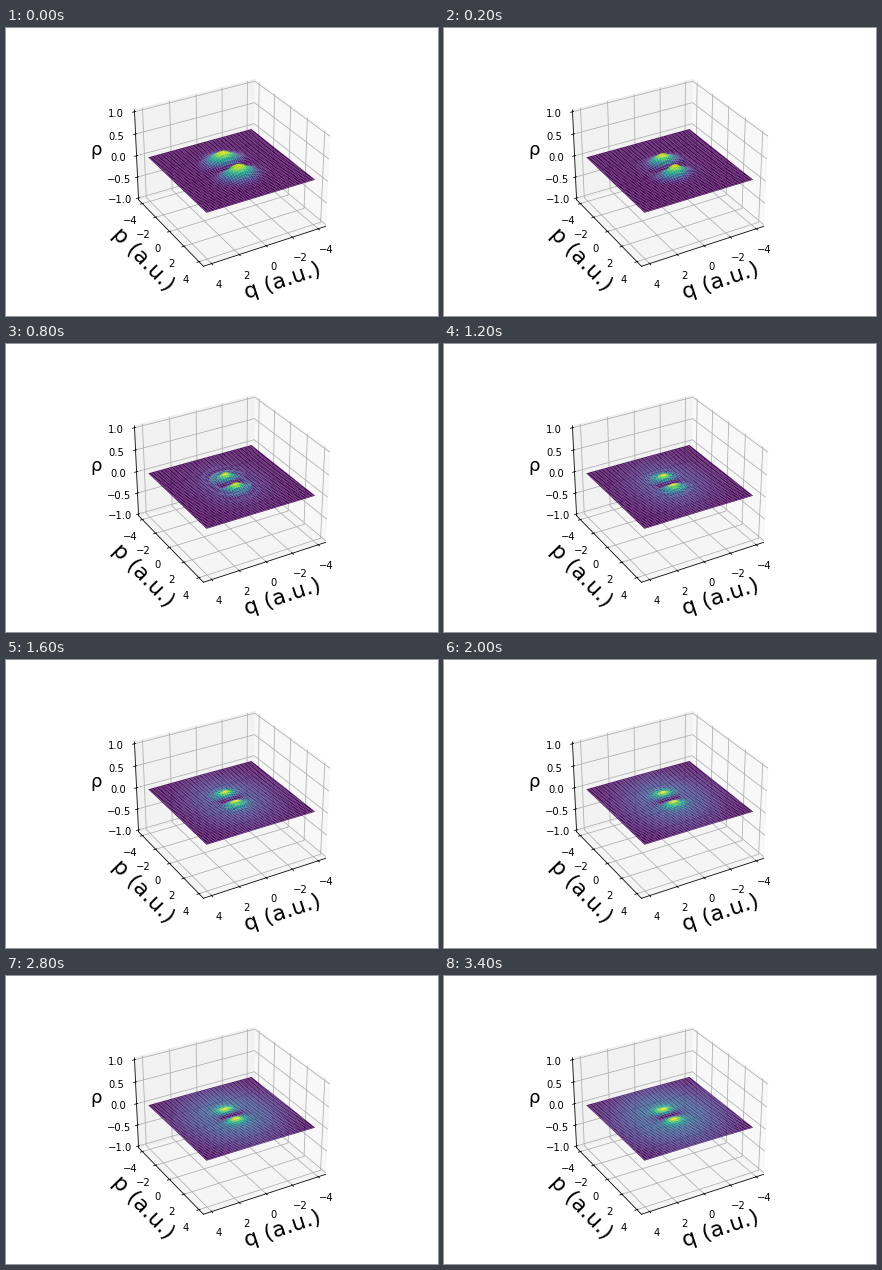
Recreate the animation shown at these times as a matplotlib script. Size 432x288 px, loop 3600 ms.

```python
import numpy as np
import matplotlib.pyplot as plt
from matplotlib.animation import FuncAnimation

FRAMES, INTERVAL = 18, 200
LIMIT = 4.4 * 25 / 24

plt.rcParams["font.family"] = "DejaVu Sans"
fig = plt.figure(figsize=(6, 4), dpi=72)
fig.subplots_adjust(left=0.125, right=0.9, bottom=0.125, top=0.88)
ax = fig.add_subplot(projection="3d")
ax.view_init(elev=30, azim=60)

axis = np.linspace(-4, 4, 100)
Q, P = np.meshgrid(axis, axis)

# Orbits of a stiffened oscillator: taller in p than wide in q.
Q_ORBIT = Q * np.sqrt(1 + 0.25 * Q**2)
ORBIT = np.hypot(Q_ORBIT, P)
ANGLE = np.arctan2(P, Q_ORBIT)


def core(k):
    """Two still lobes on the p axis that tighten with time."""
    w = 0.68 + 0.32 * np.exp(-k / 1.2)
    return np.e * (P / w) ** 2 * np.exp(-(Q**2 + P**2) / w**2)


def arms(k):
    """Spiral arms that wind up and blur into a widening background."""
    level = 0.6 * (1 - np.exp(-k / 7))
    shear = 1.15 * k * np.maximum(ORBIT - 0.85, 0)
    contrast = np.exp(-(shear / 6) ** 2 - k / 10)
    spiral = (1 - contrast * np.cos(2 * (ANGLE + shear))) ** 2
    hole = 1 - np.exp(-(P**2 + 0.4 * Q**2) / 0.5)
    spread = 1 + 0.75 * k
    return level * hole * spiral * np.exp(-Q**2 / spread - P**2 / (spread + 2))


def density(k):
    rho = core(k) + arms(k)
    height = 2 / (np.pi * np.e) / (1 + 0.17 * k)
    return rho * height / rho.max()


surfaces = []


def draw(k):
    while surfaces:
        surfaces.pop().remove()
    surfaces.append(ax.plot_surface(Q, P, density(k), cmap="viridis"))
    return surfaces


ax.set_xlim(-LIMIT, LIMIT)
ax.set_ylim(-LIMIT, LIMIT)
ax.set_zlim(-25 / 24, 25 / 24)
ax.set_xlabel("q (a.u.)", fontsize=22)
ax.set_ylabel("p (a.u.)", fontsize=22)
ax.set_zlabel("ρ", fontsize=18)

anim = FuncAnimation(fig, draw, frames=FRAMES, init_func=lambda: draw(0),
                     interval=INTERVAL, repeat=True, repeat_delay=0)
plt.show()
```
